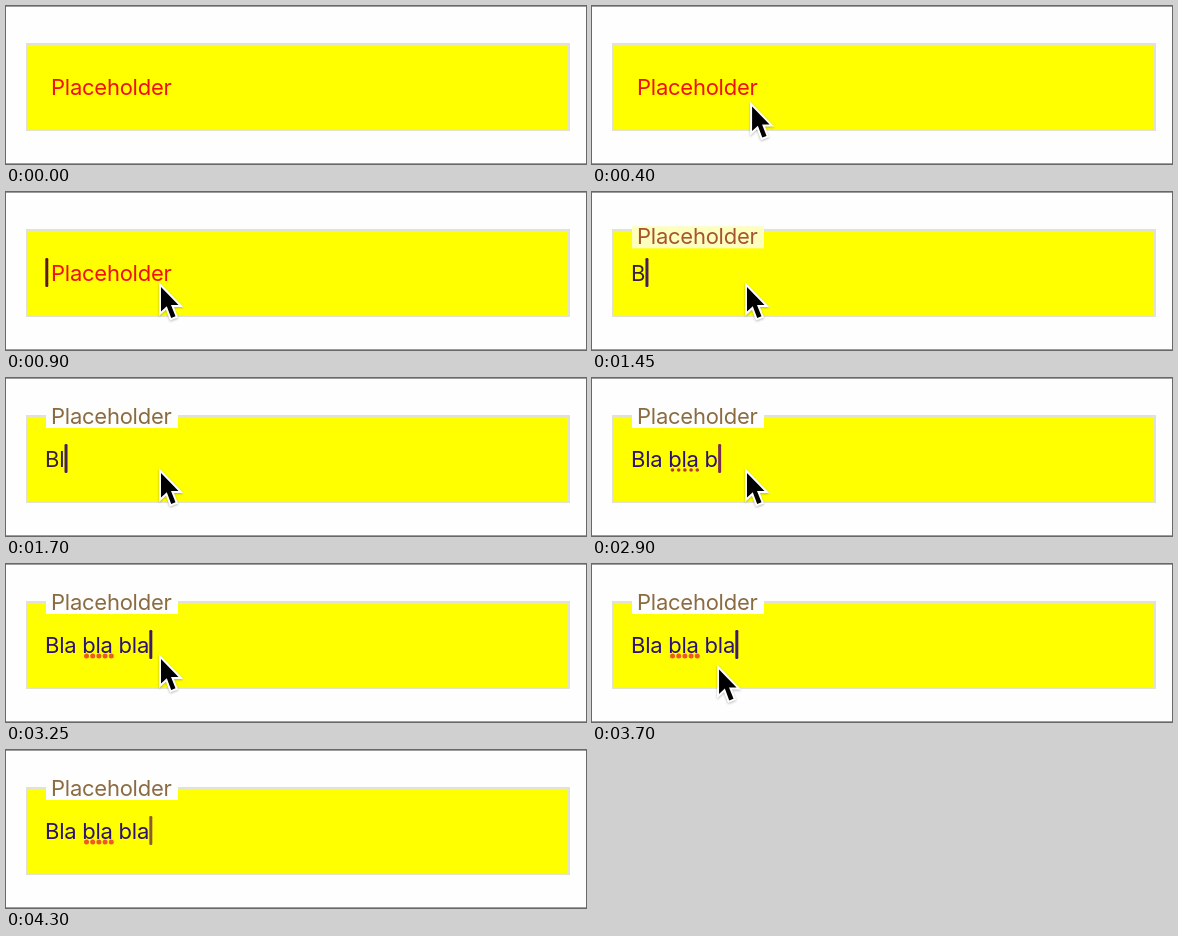
An HTML page that plays this animation: 580 by 158 pixels, repeating every 4.35 s.

```html
<!DOCTYPE html>
<html lang="en">
<head>
<meta charset="utf-8">
<title>Floating label field</title>
<style>
  html, body { margin: 0; width: 100%; height: 100%; overflow: hidden; background: #fefefe; }
  svg { display: block; width: 580px; height: 158px; }
  text { font: 22px Inter, "Liberation Sans", sans-serif; letter-spacing: -.25px; white-space: pre; }
  .rule { fill: #9c9c9c; }
  .field { fill: #ff0; stroke: #e2e2d2; stroke-width: 2; }
  .dots { stroke-linecap: round; stroke-dasharray: 0 6.2; }
  .arrow { fill: #000; stroke: #fff; stroke-width: 4; paint-order: stroke; filter: drop-shadow(0 1px 1px #0004); }
</style>
</head>
<body>
<svg viewBox="0 0 580 158">
  <rect class="rule" width="580" height="1"/>
  <rect class="rule" y="157" width="580" height="1"/>
  <rect class="field" x="21" y="38" width="542" height="86"/>
  <g id="label">
    <rect id="plate" x="40" y="71.5" width="132" height="22"/>
    <text id="name" x="45" y="89">Placeholder</text>
  </g>
  <text id="value" x="39" y="89"></text>
  <path id="dots" class="dots" d="M80.5 92H106"/>
  <rect id="caret" y="66" width="3" height="29" rx="1.2"/>
  <path id="arrow" class="arrow" d="M0 0V24.5L5.8 19.2L10.2 31L14.5 29.3L10 18H17.5Z"/>
</svg>
<script>
  const LOOP = 4350, STEP = 50;
  const TEXT = 'Bla bla bla';
  const KEYS = [1300, 1600, 1850, 2200, 2250, 2400, 2550, 2650, 2850, 3100, 3200];
  const CARET = [[750, '#8f4a12'], [900, '#5e1a14'], [1300, '#43205a'], [2850, '#7a2c4c'],
                 [3100, '#3d1a6a'], [4250, '#6a3c48'], [4300, '#8c5a34']];
  const RED = [240, 16, 16], BROWN = [139, 107, 64];
  const YELLOW = [255, 255, 0], WHITE = [254, 254, 254];

  const el = id => document.getElementById(id);
  const [label, plate, name, value, dots, caret, arrow] =
    ['label', 'plate', 'name', 'value', 'dots', 'caret', 'arrow'].map(el);

  const span = (t, from, to) => Math.min(1, Math.max(0, (t - from) / (to - from)));
  const mix = (a, b, p) => `rgb(${a.map((v, i) => Math.round(v + (b[i] - v) * p))})`;
  const easeOut = p => 1 - (1 - p) ** 3;
  const show = (node, on) => node.setAttribute('visibility', on ? 'visible' : 'hidden');
  const move = (node, x, y) => node.setAttribute('transform', `translate(${x} ${y})`);

  function drawLabel(t) {
    const tint = easeOut(span(t, 1250, 1800));
    move(label, 0, -43.5 * easeOut(span(t, 1270, 1650)));
    name.setAttribute('fill', mix(RED, BROWN, tint));
    plate.setAttribute('fill', mix(YELLOW, WHITE, tint));
  }

  function drawValue(t) {
    value.textContent = TEXT.slice(0, KEYS.filter(k => k <= t).length);
    value.setAttribute('fill', t < 1850 ? '#35204a' : '#2c1272');
    show(dots, t >= 2650);
    dots.setAttribute('stroke', t < 3100 ? '#b8382c' : '#ee5a24');
    dots.setAttribute('stroke-width', t < 3100 ? 3.6 : 5);

    const state = CARET.filter(c => c[0] <= t).pop();
    show(caret, state);
    if (state) caret.setAttribute('fill', state[1]);
    caret.setAttribute('x', 39.3 + (value.textContent ? value.getComputedTextLength() : 0));
  }

  function drawArrow(t) {
    const back = (1 - span(t, 0, 550)) ** 1.9;
    const away = span(t, 3550, 3950) ** 1.87;
    show(arrow, t >= 50 && t < 3950);
    move(arrow, 155 + 60 * back - 175 * away, 95 + 66 * back + 65 * away);
  }

  const start = performance.now();
  function frame() {
    const t = Math.floor((performance.now() - start) % LOOP / STEP) * STEP;
    drawLabel(t);
    drawValue(t);
    drawArrow(t);
    requestAnimationFrame(frame);
  }
  frame();
</script>
</body>
</html>
```
